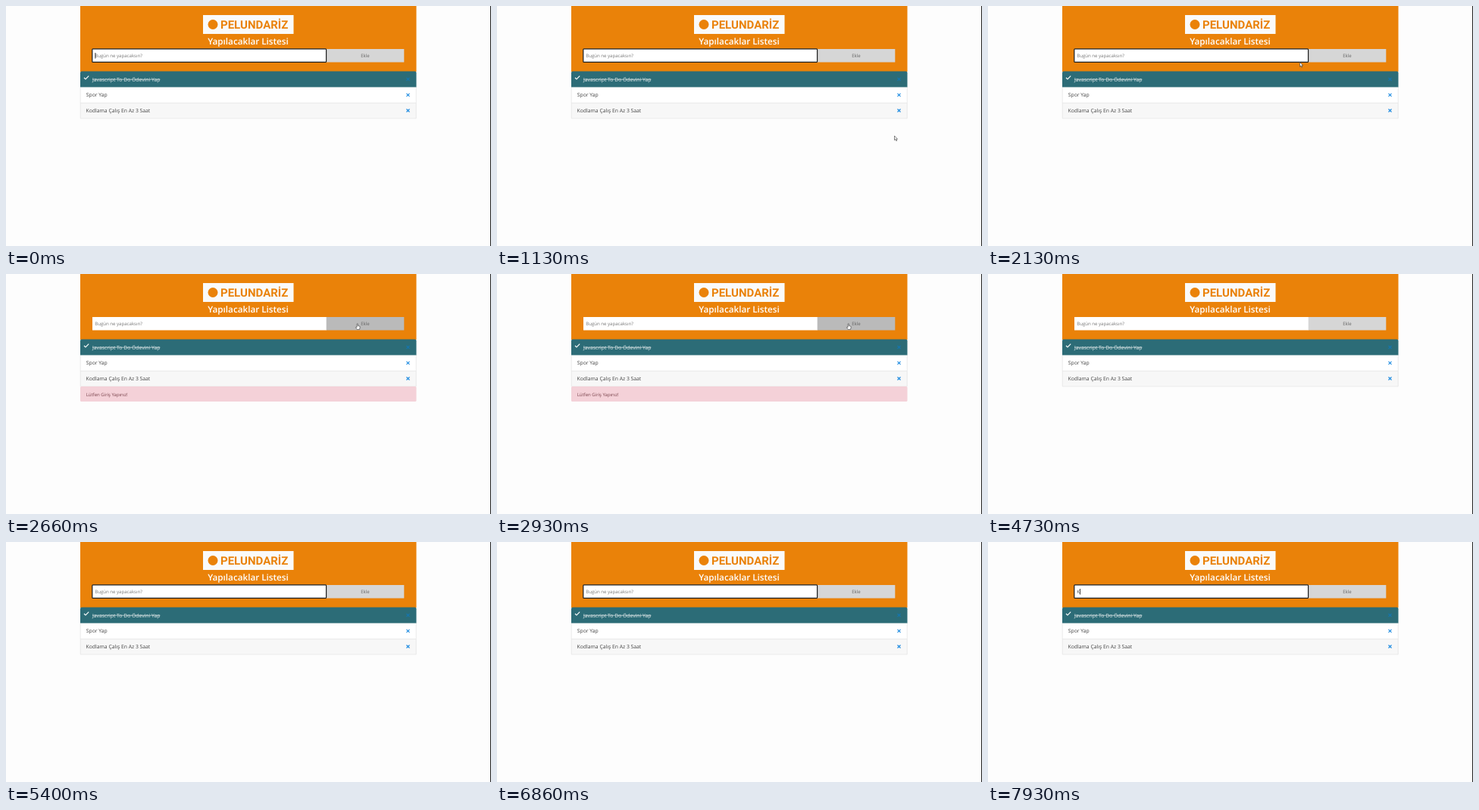
Recreate the animation shown at these times as an HTML page. Size 640 by 318 pixels, loop 8000 ms.

```html
<!DOCTYPE html>
<html lang="tr">
<head>
<meta charset="utf-8">
<title>Yapılacaklar Listesi</title>
<style>
  html, body { margin: 0; width: 100%; height: 100%; overflow: hidden; background: #fdfdfd; }
  svg { display: block; width: 100vw; height: 100vh; }
  text { font-family: "Open Sans", "Noto Sans", sans-serif; font-size: 6.8px; fill: #444; text-rendering: geometricPrecision; }
  .title { font-size: 11.7px; font-weight: 600; fill: #fff; text-anchor: middle; }
  .brand { font: 700 15px Roboto, sans-serif; fill: #ea8209; }
  .small { font-size: 6.1px; }
  .cross { fill: none; stroke: #1b8ae0; stroke-width: 1.1; }
  .pointer { fill: #fff; stroke: #333; stroke-width: .6; stroke-linejoin: round; }
</style>
</head>
<body>
<svg viewBox="0 0 640 318" preserveAspectRatio="none">
  <defs><path id="cross" d="M-2-2L2 2M2-2L-2 2"/></defs>
  <rect width="640" height="318" fill="#fdfdfd"/>
  <rect x="639" width="1" height="318" fill="#222"/>

  <rect x="98" width="443.5" height="87" fill="#ea8209"/>
  <rect x="260" y="12" width="119.5" height="25" fill="#fafafa"/>
  <circle cx="273" cy="24.5" r="6.5" fill="#ea8209"/>
  <text class="brand" x="283" y="30">PELUNDARİZ</text>
  <text class="title" x="319.5" y="51">Yapılacaklar Listesi</text>

  <rect x="114" y="57" width="309" height="17.5" fill="#fff"/>
  <rect id="button" x="422.7" y="57" width="102.6" height="17.5"/>
  <text class="small" x="474" y="68" text-anchor="middle" style="fill:#666">Ekle</text>
  <rect id="ring" x="113.8" y="56.8" width="308.8" height="17.6" rx="1" fill="#fff" stroke="#1c1c1c" stroke-width="1.2"/>
  <text id="field" class="small" x="117.2" y="68"></text>
  <rect id="caret" y="62" width=".8" height="7.6" fill="#111"/>

  <path d="M98 107.7V88.5Q98 86.5 100 86.5H539.5Q541.5 86.5 541.5 88.5V107.7Z" fill="#2c6c77"/>
  <path d="M103 95L105 97L109.2 92.6" fill="none" stroke="#fff" stroke-width="1.1"/>
  <text x="114" y="99.5" style="fill:#e4ebec;text-decoration:line-through">Javascript To Do Ödevini Yap</text>
  <rect x="98.2" y="107.7" width="443" height="20.8" fill="#fff"/>
  <rect x="98.2" y="128.5" width="443" height="20.5" rx="1" fill="#f7f7f7"/>
  <path d="M98.2 107.7V149H541.2V107.7M98.2 128.5H541.2" fill="none" stroke="#dfdfdf" stroke-width=".6"/>
  <text x="105.8" y="120.4">Spor Yap</text>
  <text x="105.6" y="141.2">Kodlama Çalış En Az 3 Saat</text>
  <g class="cross">
    <use href="#cross" x="530.5" y="97" stroke="#1676ae"/>
    <use href="#cross" x="530.5" y="117.8"/>
    <use href="#cross" x="530.5" y="138.5"/>
  </g>

  <g id="alert">
    <rect x="98" y="149" width="443.5" height="20" rx="1.5" fill="#f4d1d8"/>
    <text x="105.7" y="161.5" style="font-size:6px;fill:#79434b">Lütfen Giriş Yapınız!</text>
  </g>

  <path id="arrow" class="pointer" d="M0 0V5.8L1.3 4.6L2.3 6.8L3.2 6.4L2.3 4.3H4Z"/>
  <path id="hand" class="pointer" d="M-.6 0Q0-.8.6 0V2.6L3 3.2Q3.6 3.6 3.4 5L2.8 7.4H-.4L-2.4 4.8Q-2.2 3.8-.6 4.6Z"/>
</svg>
<script>
  const LOOP = 8000;
  const $ = id => document.getElementById(id);
  const clamp = v => Math.min(1, Math.max(0, v));
  const ease = v => v * v * (3 - 2 * v);
  const within = (t, from, to) => t >= from && t < to;
  const show = (id, on) => $(id).style.display = on ? '' : 'none';

  // Pointer stops: time, x, y
  const route = [
    [600, 531, 180], [800, 531, 180], [1130, 524.5, 172], [1530, 506, 160],
    [1730, 506, 160], [2130, 411.5, 74.5], [2530, 463.7, 66],
    [4130, 463.7, 66], [4460, 342.7, 56.7], [4600, 318, 63]
  ];

  function pointerAt(t) {
    const i = route.findIndex(stop => stop[0] > t);
    if (i < 1) return null;
    const [t0, x0, y0] = route[i - 1], [t1, x1, y1] = route[i];
    const k = ease((t - t0) / (t1 - t0));
    return [x0 + (x1 - x0) * k, y0 + (y1 - y0) * k];
  }

  function draw(t) {
    const focused = t < 2600 || t >= 4930;
    const typed = t >= 7930;
    show('ring', focused);
    $('field').textContent = typed ? 'K' : 'Bugün ne yapacaksın?';
    $('field').style.fill = typed ? '#444' : '#777';

    const blinkOn = t < 460 || within(t, 4930, 5400) || within(t, 5930, 6460) || within(t, 7000, 7530);
    show('caret', blinkOn || typed);
    $('caret').setAttribute('x', typed ? 121.2 : 117.5);

    show('alert', within(t, 2600, 4600));
    const hover = clamp((t - 2260) / 150) - clamp((t - 4330) / 160);
    const grey = Math.round(214 - 28 * hover);
    $('button').setAttribute('fill', `rgb(${grey},${grey},${grey})`);

    const pos = pointerAt(t);
    const overButton = pos && pos[0] > 423 && pos[0] < 525 && pos[1] > 57 && pos[1] < 74.5;
    show('arrow', pos && !overButton && t < 4530);
    show('hand', overButton);
    if (pos) for (const id of ['arrow', 'hand']) $(id).setAttribute('transform', `translate(${pos})`);
  }

  function tick() {
    draw(performance.now() % LOOP);
    requestAnimationFrame(tick);
  }
  tick();
</script>
</body>
</html>
```
